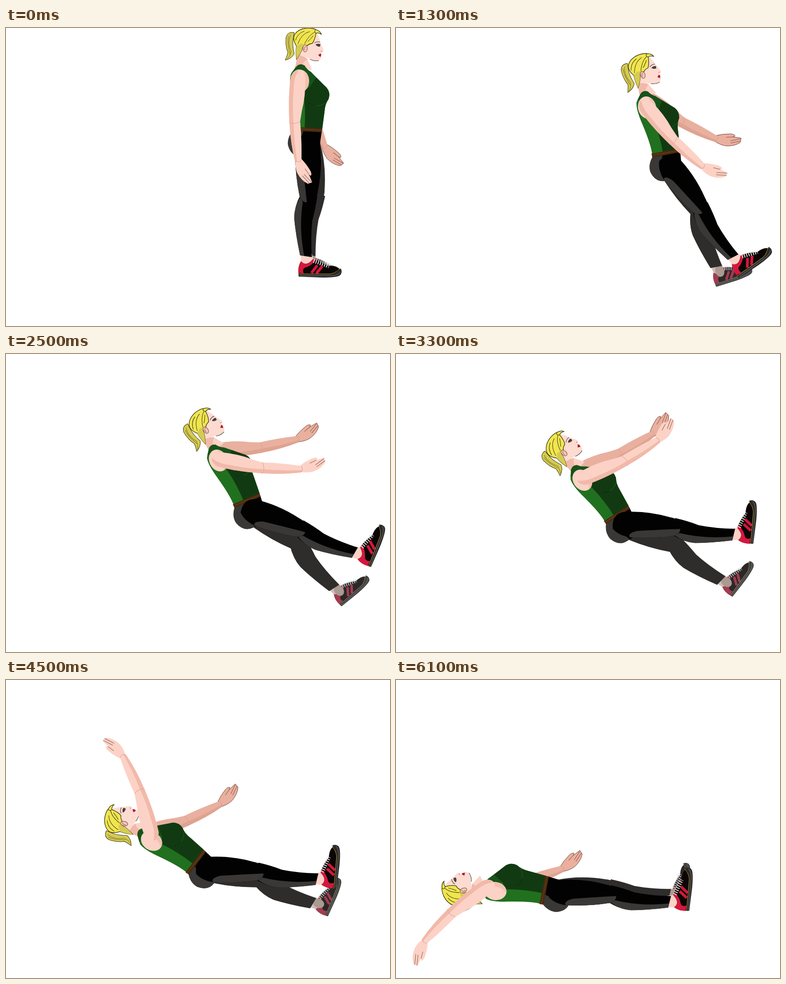
Recreate the animation shown at these times as an HTML page. Size 850 px wide and 658 px high, loop 6200 ms.

```html
<!DOCTYPE html>
<html lang="en">
<head>
<meta charset="utf-8">
<title>Falling backwards</title>
<style>
  html, body { margin: 0; width: 100%; height: 100%; overflow: hidden; background: #fff; }
  svg { display: block; width: 100vw; height: 100vh;
        --skin: #fcd2c6; --shade: #f1b9a9; --front: #020202; --back: #3a3836; --edge: none; }
  .far { --skin: #e9b09f; --shade: #dfa391; --front: #2f2d2c; --back: #2f2d2c; --edge: #5a3026; }
  .dull { filter: saturate(.75) contrast(.72); }
  .skin { fill: var(--skin); }
  .shade { fill: var(--shade); }
  .front { fill: var(--front); }
  .back { fill: var(--back); }
  .line { fill: none; stroke-width: 1; stroke-linecap: round; stroke-linejoin: round; }
</style>
</head>
<body>
<svg viewBox="0 0 850 658">
  <defs>
    <g id="arm">
      <path class="skin" d="M641 286Q640 302 645 314Q654 331 668 337L677 334L670 317L674 320Q677 317 673 309Q664 294 654 284Z" stroke="var(--edge)" stroke-width=".8"/>
      <path class="line" d="M660 317L675 333M656 320L671 336M662 305L670 317" stroke="#8d5548"/>
      <path class="skin" d="M628 203Q630 248 640 288Q647 293 654 286Q655 245 651 200Z"/>
      <path class="shade" d="M628 203Q630 248 640 288L645 290Q638 250 637 206Z"/>
      <path class="skin" d="M631 108Q637 92 650 92Q662 95 662 114Q663 150 655 180L651 204Q640 211 628 205Q625 150 631 108Z"/>
      <path class="shade" d="M631 108Q637 93 648 94Q637 108 637 140Q634 170 637 206L628 205Q625 150 631 108Z"/>
      <path class="line" d="M628 205Q640 211 651 203M641 288Q647 293 653 287" stroke="#d99f90"/>
    </g>
    <g id="thigh">
      <path class="front" d="M656 236Q686 231 694 254Q702 305 690 362Q688 382 671 386Q655 386 650 372Q640 325 640 275Q642 250 656 236Z"/>
      <path class="back" d="M640 275Q640 325 650 372Q656 386 666 385Q660 330 655 290Q648 268 640 275Z"/>
    </g>
    <g id="shin">
      <path class="front" d="M651 370Q638 395 638 420Q641 455 651 502L677 506Q674 460 678 425Q685 400 689 372Q670 362 651 370Z"/>
      <path class="back" d="M651 374Q638 395 638 420Q641 455 651 502L660 503Q648 440 657 384Z"/>
    </g>
    <g id="foot">
      <path d="M652 498H677L680 514Q668 530 653 519Z" fill="#fcd2c6"/>
      <path d="M648 544Q645 527 653 515Q664 528 679 511Q692 512 714 526Q735 525 742 538L741 545Z" fill="#0b0506"/>
      <path d="M647 541Q646 526 653 515Q664 528 679 511L686 513Q676 525 662 529Q655 532 659 542Z" fill="#d5173d"/>
      <path d="M676 541L689 524M687 542L700 526" stroke="#d5173d" stroke-width="6"/>
      <path d="M647 543H720Q735 540 741 531Q746 541 738 547Q730 551 700 551L648 549Z" fill="#2c2b2b"/>
      <path class="line" d="M647 543H718Q732 540 739 531" stroke="#b29a35" stroke-width="1.6"/>
      <path class="line" d="M650 547H722Q734 546 740 540" stroke="#77746f"/>
      <path d="M681 514L715 526" stroke="#deded8" stroke-width="9" stroke-dasharray="2 3"/>
    </g>
  </defs>

  <g id="body">
    <g id="farArm" class="far"><use href="#arm" x="5" y="-19"/></g>

    <g id="farThigh" class="far">
      <g id="farShin">
        <g class="dull"><use href="#foot" transform="translate(53.2 40.2) scale(.92)"/></g>
        <ellipse cx="668" cy="515" rx="10" ry="13" fill="#a99a92"/>
        <use href="#shin"/>
      </g>
      <use href="#thigh"/>
    </g>

    <g id="head">
      <path d="M646 54L641 84Q655 94 677 92L667 68Z" fill="#fcd2c6"/>
      <path d="M646 54L641 84L655 88Q656 74 668 69Z" fill="#f1b9a9"/>
      <path d="M660 14L686 8Q694 20 696 32L703 49Q702 53 698 53L698 60Q699 67 692 72Q680 74 672 68L650 60Z" fill="#fddbd1"/>
      <path class="line" d="M692 72Q682 74 673 69" stroke="#3b2a25"/>
      <path d="M638 10Q624 7 620 20Q618 40 624 54Q622 63 618 71Q632 68 638 57Q633 36 636 22Z" fill="#d6cb52" stroke="#33320f"/>
      <path class="line" d="M630 15Q622 32 631 52Q629 62 622 69M625 18Q622 36 629 58" stroke="#7b742a"/>
      <path d="M643 69Q641 50 643 40Q633 24 639 14Q648 1 668 0Q680 0 687 4Q696 7 698 14Q690 9 686 12Q684 26 678 34Q670 35 667 39Q656 37 655 48Q651 58 643 69Z" fill="#f0e54f" stroke="#33320f" stroke-width="1.3"/>
      <path d="M643 40L653 34L667 38Q656 37 655 48Q651 58 643 69Q641 50 643 40Z" fill="#d6cb52"/>
      <path class="line" d="M684 9Q670 15 661 35M680 17Q673 26 668 30M672 8Q654 12 646 35M660 7Q645 12 641 27M686 12Q680 5 686 4" stroke="#33320f" stroke-width="1.3"/>
      <ellipse cx="662" cy="45" rx="5" ry="8" fill="#f6c5b6" stroke="#6d4638"/>
      <path class="line" d="M660 49Q659 41 664 41" stroke="#8d5548"/>
      <path class="line" d="M683 33Q689 29 695 31" stroke="#2c211c" stroke-width="2"/>
      <path d="M685 37Q690 33 696 36L695 41Q690 42 685 37Z" fill="#473f3b"/>
      <path class="line" d="M697 51L700 52" stroke="#a66"/>
      <path d="M691 60L696 56L698 59L696 64Z" fill="#b5142c"/>
    </g>

    <path d="M637 225Q622 240 624 258Q630 283 652 284Q675 286 692 262L699 228Z" fill="#3a3836"/>
    <path d="M658 228L699 228L694 262Q676 291 658 284Q650 255 658 228Z" fill="#020202"/>
    <path d="M644 84Q652 77 661 83Q666 92 675 97Q690 114 710 132Q719 143 714 157Q706 168 705 185L700 223L637 221Q640 200 632 150Q626 115 631 100Z" fill="#21701f"/>
    <path d="M644 84Q652 77 661 83Q666 92 675 97L687 109L672 130Q662 100 650 98L634 96Z" fill="#17531a"/>
    <path d="M687 109L710 132Q719 143 714 157Q706 168 705 185L700 223L661 221Q664 180 658 140L672 130Z" fill="#123a12"/>
    <path class="line" d="M673 167Q688 178 709 165" stroke="#1c5f1c" stroke-width="2.5"/>
    <path class="line" d="M670 165Q678 171 686 172" stroke="#092309"/>
    <path d="M636 218L700 222L699 230L636 227Z" fill="#4a2a10"/>
    <path class="line" d="M637 222L698 226" stroke="#75451a" stroke-width="2.5"/>
    <ellipse cx="651" cy="117" rx="20" ry="25" fill="#fcd2c6"/>
    <path d="M660 95A20 25 0 0 1 651 142Q666 122 660 95Z" fill="#f3c0b1"/>

    <g id="nearThigh">
      <g id="nearShin"><use href="#foot"/><use href="#shin"/></g>
      <use href="#thigh"/>
    </g>
    <g id="nearArm"><use href="#arm" transform="translate(-19.6 -3.2) scale(1.03)"/></g>
  </g>
</svg>
<script>
const LOOP = 6200, STEP = 100, MIDDLE = 3100, END = 6100;

// Waist position and the turn of each part, in degrees from the drawn pose
const standing = { x: 668, y: 224, torso: 0, head: 0, nearArm: 0, farArm: -17,
                   nearThigh: 0, nearShin: 0, farThigh: -8, farShin: 4 };
const tipping = { x: 501, y: 347, torso: -33, head: -45, nearArm: -103, farArm: -117,
                  nearThigh: -86, nearShin: -85, farThigh: -66, farShin: -52 };
const lying = { x: 328, y: 464, torso: -82, head: -114, nearArm: -311, farArm: -104,
                nearThigh: -87, nearShin: -85, farThigh: -93, farShin: -86 };

// Each part hangs on a parent and turns about its joint
const joints = {
  head: ['torso', 656, 80],
  nearArm: ['torso', 655, 106],
  farArm: ['torso', 660, 87],
  nearThigh: ['torso', 657, 255],
  farThigh: ['torso', 663, 251],
  nearShin: ['nearThigh', 670, 375],
  farShin: ['farThigh', 670, 375]
};

function poseAt(time) {
  const [from, to, part] = time < MIDDLE
    ? [standing, tipping, time / MIDDLE]
    : [tipping, lying, (time - MIDDLE) / (END - MIDDLE)];
  const pose = {};
  for (const key in from) pose[key] = from[key] + (to[key] - from[key]) * part;
  return pose;
}

const place = (id, transform) => document.getElementById(id).setAttribute('transform', transform);

function draw(now) {
  const pose = poseAt(Math.floor(now % LOOP / STEP) * STEP);
  place('body', `translate(${pose.x} ${pose.y}) rotate(${pose.torso}) translate(${-standing.x} ${-standing.y})`);
  for (const [id, [parent, x, y]] of Object.entries(joints)) {
    place(id, `rotate(${pose[id] - pose[parent]} ${x} ${y})`);
  }
}

let start;
function tick(now) {
  start ??= now;
  draw(now - start);
  requestAnimationFrame(tick);
}
draw(0);
requestAnimationFrame(tick);
</script>
</body>
</html>
```
